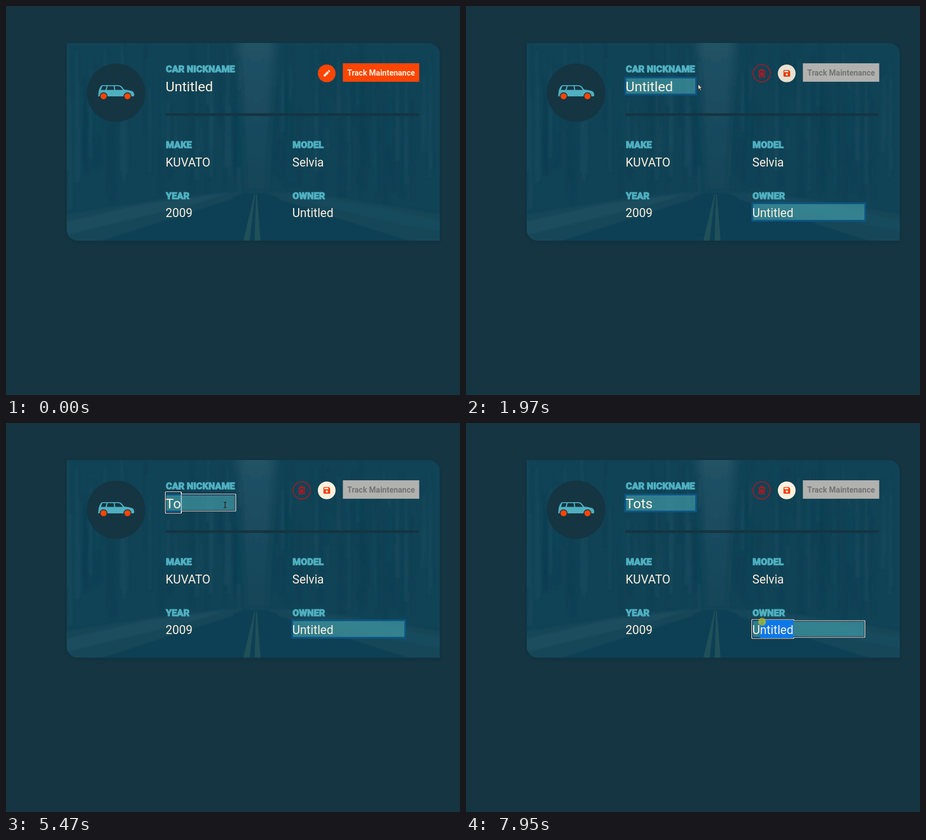
Recreate the animation shown at these times as an HTML page. Size 808x693 px, loop 8000 ms.

```html
<!DOCTYPE html>
<html lang="en">
<head>
<meta charset="utf-8">
<title>Car card</title>
<style>
html, body { margin: 0; width: 100%; height: 100%; overflow: hidden; background: #153542; }
svg { display: block; width: 808px; height: 693px; font-family: Roboto, "Open Sans", sans-serif; }
.label { font-size: 16.7px; font-weight: 900; fill: #4fb0c0; stroke: #4fb0c0; stroke-width: 1; }
.value { font-size: 21.3px; fill: #fdf1df; }
.big { font-size: 24.6px; }
.field { fill: #47a3ae; fill-opacity: .62; stroke: #0c5584; stroke-width: 3; }
.ring path { fill: none; stroke-linejoin: round; }
</style>
</head>
<body>
<svg viewBox="0 0 808 693">
  <defs>
    <clipPath id="card"><path d="M108 66H752A20 20 0 0 1 772 86V418H128A20 20 0 0 1 108 398Z"/></clipPath>
    <filter id="soft" x="-20%" y="-20%" width="140%" height="140%"><feGaussianBlur stdDeviation="2"/></filter>
    <filter id="haze" x="-50%" y="-50%" width="200%" height="200%"><feGaussianBlur stdDeviation="8"/></filter>
    <filter id="shade" x="-5%" y="-5%" width="110%" height="115%"><feGaussianBlur stdDeviation="2.5"/></filter>
    <linearGradient id="sky" x1="0" y1="0" x2="0" y2="1">
      <stop offset="0" stop-color="#225366"/><stop offset=".45" stop-color="#1b4c5f"/><stop offset="1" stop-color="#124558"/>
    </linearGradient>
  </defs>

  <path d="M108 68H752A20 20 0 0 1 772 88V420H128A20 20 0 0 1 108 400Z" fill="#0e2833" opacity=".4" filter="url(#shade)"/>
  <g clip-path="url(#card)">
    <rect x="108" y="66" width="664" height="352" fill="#114356"/>
    <path d="M412 50H478L464 330H428Z" fill="url(#sky)" filter="url(#haze)"/>
    <g id="trees" filter="url(#soft)"></g>
    <g filter="url(#soft)">
      <path d="M100 372L290 342 410 331H480L600 342 780 372V425H100Z" fill="#154759"/>
      <path d="M100 386L250 352 400 332 330 354 180 390 100 410Z" fill="#1d4f60" opacity=".75"/>
      <path d="M780 384L640 355 485 332 560 354 690 386 780 402Z" fill="#1d4f60" opacity=".65"/>
      <path d="M425 333H462L745 425H140Z" fill="#114154"/>
      <path d="M404 342L165 418M484 342L722 418" stroke="#1f5163" stroke-width="2" opacity=".6"/>
    </g>
    <path d="M442 335H443.500L433.500 418H422.500ZM445 335H446.500L453 418H442.500Z" fill="#205059"/>
  </g>

  <circle cx="196" cy="154.500" r="52" fill="#153542"/>
  <path d="M164 161L165 151Q166 146 169 142.500Q170 141 172 141H200Q204 141 206 143.500L210.500 149Q222 150 226 152.500Q229 156 228 160Q228 161 226 161H165Z" fill="#4fb0c0"/>
  <path d="M169 149.500L171.500 142.800H179L177 149.500ZM179.300 149.500L181 142.800H191.500L192.500 149.500ZM194.500 149.500L193.500 142.800H200Q203 143 204.500 145L208 149.500Z" fill="#153542"/>
  <g fill="#153542"><circle cx="173.700" cy="160.700" r="7"/><circle cx="216.200" cy="160.700" r="7"/></g>
  <g fill="#ff4500"><circle cx="173.700" cy="160.700" r="5.500"/><circle cx="216.200" cy="160.700" r="5.500"/></g>

  <rect x="284" y="191" width="451" height="5" fill="#153542"/>

  <g class="label">
    <text x="284.500" y="118">CAR NICKNAME</text>
    <text x="284.500" y="253">MAKE</text>
    <text x="510" y="253">MODEL</text>
    <text x="284.500" y="344">YEAR</text>
    <text x="510" y="344">OWNER</text>
  </g>

  <g id="fields">
    <rect class="field" x="283.500" y="127.500" width="126" height="30"/>
    <rect class="field" x="509.500" y="351.500" width="201" height="31"/>
  </g>
  <g class="ring" id="nickRing"><path stroke="#0d1a22" stroke-width="3"/><path stroke="#fff" stroke-width="1.200"/></g>
  <g class="ring" id="ownerRing"><path stroke="#0d1a22" stroke-width="3"/><path stroke="#fff" stroke-width="1.200"/></g>
  <rect id="selection" y="351" height="32" fill="#0b78e8"/>

  <g class="value">
    <text id="nick" class="big" x="284" y="151.500"></text>
    <text x="284" y="285.500">KUVATO</text>
    <text x="509.500" y="285.500">Selvia</text>
    <text x="284" y="375.500">2009</text>
    <text id="owner" x="509.500" y="375.500">Untitled</text>
  </g>
  <rect id="caret" y="123" width="1" height="38" fill="#fff"/>

  <rect id="track" x="600" y="102.500" width="135" height="32" stroke-width="1"/>
  <text id="trackText" x="667.500" y="124" text-anchor="middle" font-size="14" font-weight="600">Track Maintenance</text>

  <g id="edit">
    <circle cx="570.800" cy="120" r="15.800" fill="#ff4500"/>
    <path d="M565.500 125.500V122.800L572 116.300L574.700 119L568.200 125.500ZM572.800 115.500L574 114.300Q574.600 113.800 575.200 114.300L576.700 115.800Q577.200 116.400 576.700 117L575.500 118.200Z" fill="#fdf1df"/>
  </g>
  <g id="trash" fill="none" stroke="#cf1018">
    <circle cx="526.300" cy="120" r="15.300" stroke-width="1.300"/>
    <path d="M520.500 115.500H532.500M524.500 115V113.200H528.500V115M522 116V126.200H531V116M524.700 118V124.500M526.500 118V124.500M528.300 118V124.500" stroke-width="1.500"/>
  </g>
  <g id="save">
    <circle cx="570.800" cy="120" r="15.800" fill="#fff1de"/>
    <path d="M566.500 114H574.500L577 116.500V124.500Q577 126 575.500 126H566.500Q565 126 565 124.500V115.500Q565 114 566.500 114Z" fill="#f8400c"/>
    <rect x="566.500" y="115.300" width="7" height="2.700" fill="#fff1de"/>
    <circle cx="571" cy="122" r="1.900" fill="#fff1de"/>
  </g>

  <g id="pointer">
    <path id="arrow" d="M0 0V10L2.300 8L4 11.700L5.800 10.900L4.200 7.300H7.200Z" fill="#f6d5cc" stroke="#101a20" stroke-width=".9"/>
    <path id="hand" d="M-1.500 -5Q0 -6.500 1 -5L2 -1L5 0Q6.500 1 5.500 4L4 8H-2L-6 3Q-6 1 -4 2L-2 3.500Z" fill="#a9cfe0" stroke="#11202a" stroke-width="1.200"/>
    <path id="beam" d="M-2.500 -5Q0 -5 0 -3.500Q0 -5 2.500 -5M0 -4V4.500M-2.500 5Q0 5 0 3.500Q0 5 2.500 5" fill="none" stroke="#2a2424" stroke-width="1.400"/>
    <circle id="press" r="7" fill="#b3c12a" opacity=".75"/>
  </g>
</svg>
<script>
const LOOP = 8000;
const el = id => document.getElementById(id);
const show = (id, on) => { el(id).style.display = on ? "" : "none"; };
const clamp = v => Math.max(0, Math.min(1, v));
const last = (table, t) => table.filter(row => row[0] <= t).pop();

const typed = [
  [0, "Untitled"], [3850, "Untitle"], [4300, "Untitl"], [4380, "Unti"], [4460, "Un"],
  [4540, ""], [5170, "T"], [5470, "To"], [5560, "Tot"], [5870, "Tots"]
];
// start, step length, steps
const bursts = [[260, 78, 10], [1810, 76, 5], [6890, 75, 10], [7710, 80, 3]];
const path = [
  [260, 722, 641], [500, 640, 420], [720, 590, 200], [884, 573, 130], [1040, 570, 119],
  [1810, 525, 122], [1886, 455, 134], [1962, 413, 139], [2038, 378, 143], [2190, 390, 146],
  [6890, 394, 160], [7115, 500, 400], [7265, 565, 441], [7490, 623, 369], [7640, 619, 366],
  [7710, 604, 364], [7790, 575, 360], [7950, 527, 354]
];
const shapes = [[0, ""], [260, "arrow"], [880, "hand"], [1810, "arrow"], [2030, "beam"], [6960, "arrow"], [7490, "beam"]];
const picked = [[0, 8], [7710, 7], [7790, 5], [7870, 3], [7950, 1]];
const presses = [[1270, 1440], [2360, 2520], [7640, LOOP]];
const EDIT = 1500, FOCUS = 2380, SWITCH = 7640;

function plantTrees() {
  let seed = 17, out = "";
  const rnd = () => (seed = seed * 16807 % 2147483647) / 2147483647;
  for (let i = 0; i < 130; i++) {
    const left = rnd() < .5;
    const x = left ? 108 + rnd() * 312 : 470 + rnd() * 302;
    const near = Math.abs(x - 447) / 330;
    const top = 55 + rnd() * 150, foot = top + 60 + rnd() * (270 + near * 40 - top);
    const w = 1.5 + rnd() * 4, light = rnd() < .45;
    out += `<path d="M${x - w / 2} ${top}h${w}L${x + w} ${foot}h${-2 * w}Z" fill="${light ? "#235b6d" : "#0b3b4d"}" opacity=".15"/>`;
  }
  el("trees").innerHTML = out;
}

function snap(t) {
  const b = last(bursts, t);
  return b ? b[0] + Math.min(b[2], Math.floor((t - b[0]) / b[1])) * b[1] : 0;
}

function place(t) {
  const i = path.findIndex(p => p[0] > t);
  if (i < 0) return path[path.length - 1].slice(1);
  if (i === 0) return path[0].slice(1);
  const [a, b] = [path[i - 1], path[i]];
  const k = (t - a[0]) / (b[0] - a[0]);
  return [a[1] + (b[1] - a[1]) * k, a[2] + (b[2] - a[2]) * k];
}

// Outline around a field joined with its taller line of text
function ring(id, x, w, top, bottom, lip, textW) {
  const t = top + lip, b = bottom - lip, r = x + w, m = x + textW;
  const d = textW
    ? `M${x + 1} ${top}H${m - 1}L${m} ${top + 1}V${t}H${r - 1}L${r} ${t + 1}V${b - 1}L${r - 1} ${b}H${m}V${bottom - 1}L${m - 1} ${bottom}H${x + 1}L${x} ${bottom - 1}V${top + 1}Z`
    : `M${x} ${t}H${r}V${b}H${x}Z`;
  for (const p of el(id).children) p.setAttribute("d", d);
}

function draw(t) {
  const editing = t >= EDIT, focused = t >= FOCUS && t < SWITCH, owner = t >= SWITCH;
  const [since, text] = last(typed, t);
  const nick = el("nick");
  if (nick.textContent !== text) nick.textContent = text;
  const width = text ? nick.getComputedTextLength() : 0;

  show("fields", editing);
  show("trash", editing);
  show("save", editing);
  show("edit", !editing);
  el("edit").style.opacity = 1 - .32 * clamp((t - 880) / 160);
  el("save").style.opacity = .68 + .32 * clamp((t - 1800) / 240);
  el("track").setAttribute("fill", editing ? "#b1b1af" : "#ff4500");
  el("track").setAttribute("stroke", editing ? "#a5aaa9" : "#ee4a14");
  el("trackText").setAttribute("fill", editing ? "#727474" : "#fdf1df");

  show("nickRing", focused);
  if (focused) ring("nickRing", 283.5, 125.5, 122.5, 161, 4, width ? width + 1 : 0);
  show("caret", focused && (t - Math.max(since, FOCUS)) % 1060 < 530);
  el("caret").setAttribute("x", 284 + width);

  const name = el("owner"), len = name.getComputedTextLength();
  show("ownerRing", owner);
  if (owner) ring("ownerRing", 508.5, 201.5, 350, 384, 2, len + 2);
  const from = last(picked, t)[1];
  show("selection", from < 8);
  if (from < 8) {
    const x = name.getStartPositionOfChar(from).x;
    el("selection").setAttribute("x", x);
    el("selection").setAttribute("width", 509.5 + len - x);
  }

  const shape = last(shapes, t)[1];
  for (const s of ["arrow", "hand", "beam"]) show(s, s === shape);
  show("press", presses.some(([a, b]) => t >= a && t < b));
  el("pointer").setAttribute("transform", `translate(${place(snap(t))})`);
}

plantTrees();
const start = performance.now();
function tick() {
  draw((performance.now() - start) % LOOP);
  requestAnimationFrame(tick);
}
tick();
</script>
</body>
</html>
```
